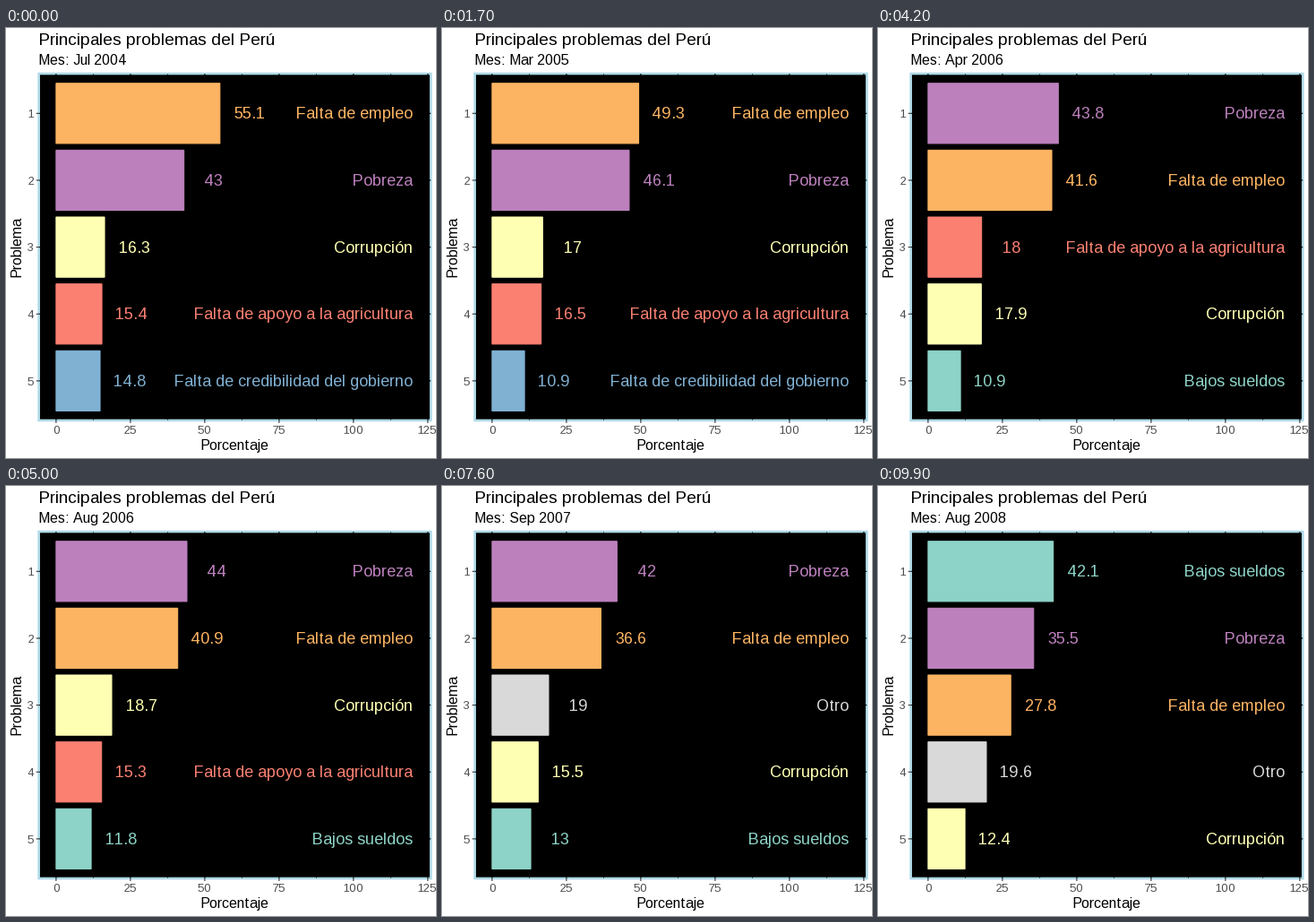
These frames come from a looping animation (480 by 480 pixels, 10000 ms). A matplotlib script:

```python
import numpy as np
import matplotlib.pyplot as plt
from matplotlib.animation import FuncAnimation
from matplotlib.patches import Rectangle

plt.rcParams.update({
    "font.family": "Liberation Sans",
    "text.hinting_factor": 1,
    "text.kerning_factor": 6,
    "path.snap": False,
})

SIZE, DPI = 480, 72  # at 72 dpi one point is one pixel
LEFT, RIGHT, TOP, BOTTOM = 36.7, 474.2, 51, 438
X0, UNIT = 55.9, 3.3197
ROW, ROW_GAP = 95.3, 74.65
BAR_H = 0.9 * ROW_GAP
LABEL_SIZE = 17.5
FRAMES, HOLD, SHOWN = 100, 2, 5
GREY = "#333333"
MONTHS = "Jan Feb Mar Apr May Jun Jul Aug Sep Oct Nov Dec".split()

# Percentages at a few months; the months between are interpolated.
KNOTS = [0, 8, 13, 21, 29, 38, 49]
PROBLEMS = [
    ("Falta de empleo", "#FDB462", [55.1, 49.3, 48.2, 41.6, 42.3, 36.6, 27.8]),
    ("Pobreza", "#BC80BD", [43, 46.1, 42.1, 43.8, 43, 42, 35.5]),
    ("Corrupción", "#FFFFB3", [16.3, 17, 15.1, 17.9, 19.3, 15.5, 12.4]),
    ("Falta de apoyo a la agricultura", "#FB8072",
     [15.4, 16.5, 17.8, 18, 12, 11, 9]),
    ("Falta de credibilidad del gobierno", "#80B1D3",
     [14.8, 10.9, 11, 9, 9, 8, 7]),
    ("Bajos sueldos", "#8DD3C7", [11, 10, 12.7, 10.9, 12, 13, 42.1]),
    ("Otro", "#D9D9D9", [5, 6, 7, 8, 13.5, 19, 19.6]),
    ("Mala calidad de la educación estatal", "#FCCDE5",
     [9, 9, 9, 9.5, 12.6, 12, 11]),
]


def build_series():
    rng = np.random.default_rng(4)
    months = np.arange(FRAMES // HOLD)
    phase = np.interp(months, KNOTS, np.arange(len(KNOTS)))
    wobble = np.abs(np.sin(np.pi * phase))  # zero at the knots
    rows = [np.interp(months, KNOTS, vals)
            + 0.6 * wobble * rng.standard_normal(len(months))
            for _, _, vals in PROBLEMS]
    return np.round(rows, 1)


SERIES = build_series()


def px(value):
    return X0 + value * UNIT


def row_y(rank):
    return ROW + rank * ROW_GAP


fig = plt.figure(figsize=(SIZE / DPI, SIZE / DPI), dpi=DPI, facecolor="white")
ax = fig.add_axes([0, 0, 1, 1])
ax.set_xlim(0, SIZE)
ax.set_ylim(SIZE, 0)
ax.axis("off")


def line(xs, ys, color, width, z):
    ax.plot(xs, ys, color=color, lw=width, zorder=z,
            solid_capstyle="butt", snap=False)


def label(x, y, s, size, color="black", ha="left"):
    return ax.text(x, y, s, fontsize=size, color=color, ha=ha,
                   va="baseline", zorder=5)


ax.add_patch(Rectangle((LEFT, TOP), RIGHT - LEFT, BOTTOM - TOP,
                       facecolor="black", edgecolor="lightblue", lw=2.6,
                       zorder=1, snap=False))
for v in np.arange(0, 126, 12.5):
    major = v % 25 == 0
    line([px(v)] * 2, [TOP, BOTTOM], "black", 1.07 if major else 0.55, 2)
    if major:
        line([px(v)] * 2, [BOTTOM, BOTTOM + 3], GREY, 1.07, 4)
        label(px(v), 453, f"{v:g}", 12.8, "#4D4D4D", "center")
for r in range(SHOWN):
    y = row_y(r)
    line([LEFT, RIGHT], [y, y], "black", 1.07, 2)
    line([LEFT - 3, LEFT], [y, y], GREY, 1.07, 4)
    label(31.3, y + 4.6, str(r + 1), 12.8, "#4D4D4D", "right")

label(36.3, 19, "Principales problemas del Perú", 19.2)
subtitle = label(36.3, 41, "", 16)
label(254.6, 471, "Porcentaje", 16, ha="center")
ax.text(19, 243.5, "Problema", fontsize=16, rotation=90,
        ha="right", va="center")

bars, numbers, names = [], [], []
for r in range(SHOWN):
    y = row_y(r)
    bar = Rectangle((X0, y - BAR_H / 2), 0, BAR_H, lw=1.07, zorder=3,
                    joinstyle="miter", snap=False)
    bars.append(ax.add_patch(bar))
    numbers.append(label(X0, y + 6, "", LABEL_SIZE, ha="center"))
    names.append(label(px(120), y + 6, "", LABEL_SIZE, ha="right"))


def update(i):
    month = i // HOLD
    year, m = divmod(month + 6, 12)
    subtitle.set_text(f"Mes: {MONTHS[m]} {2004 + year}")
    values = SERIES[:, month]
    order = np.argsort(-values, kind="stable")[:SHOWN]
    for k, bar, number, name in zip(order, bars, numbers, names):
        text, color, _ = PROBLEMS[k]
        bar.set_width(values[k] * UNIT)
        bar.set_color(color)
        number.set_text(f"{values[k]:g}")
        number.set_x(px(values[k] + 10))
        name.set_text(text)
        number.set_color(color)
        name.set_color(color)
    return [subtitle, *bars, *numbers, *names]


anim = FuncAnimation(fig, update, frames=FRAMES, interval=100,
                     repeat=True, repeat_delay=0, blit=False)
plt.show()
```
